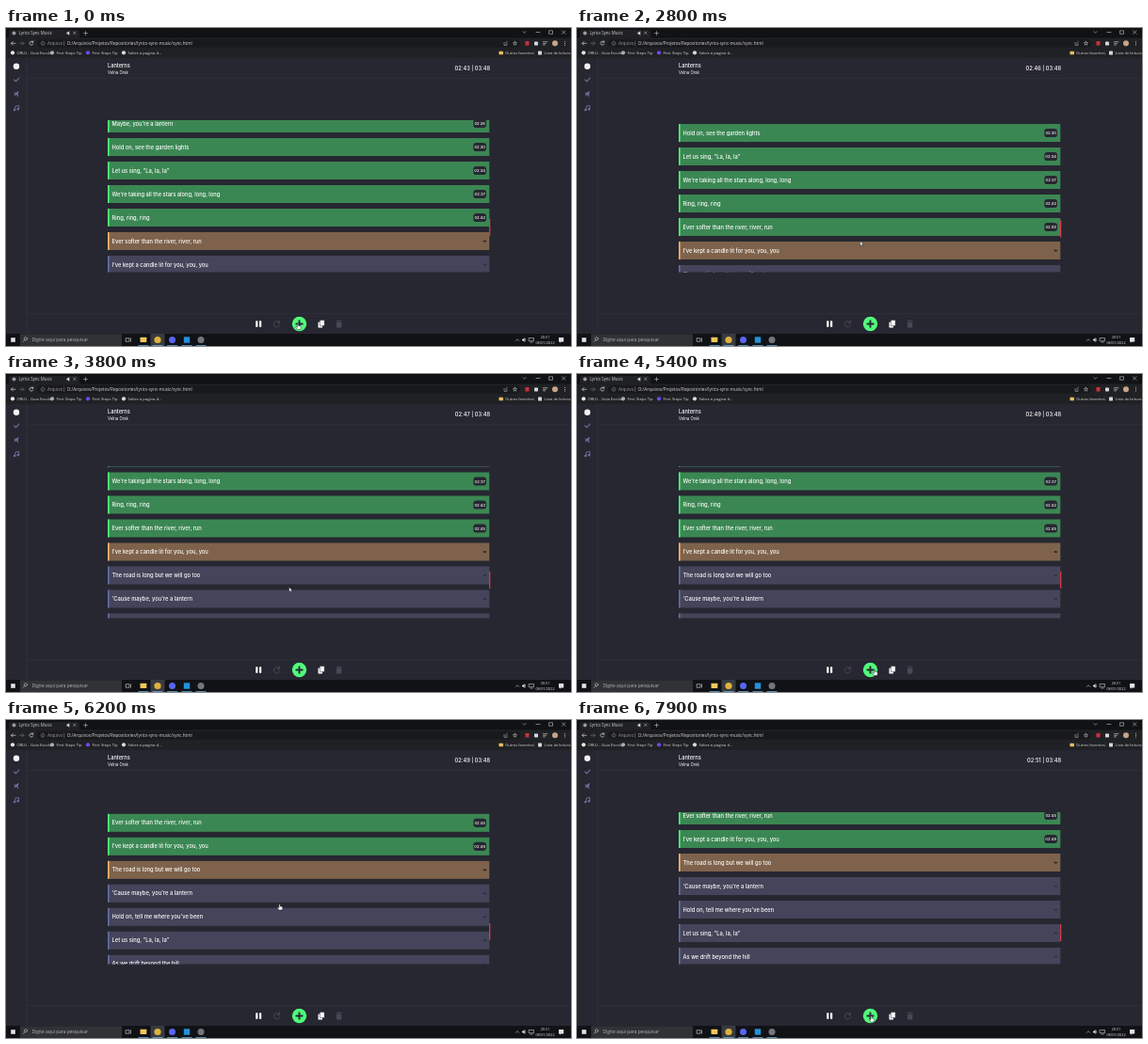
Recreate the animation shown at these times as an HTML page. Size 600x338 px, loop 8000 ms.

```html
<!DOCTYPE html>
<html lang="pt-BR">
<head>
<meta charset="utf-8">
<title>Lyrics Sync Music</title>
<style>
  html, body { margin: 0; width: 100%; height: 100%; overflow: hidden; background: #272731; }
  svg { display: block; width: 100vw; height: 100vh; font-family: Inter, "Open Sans", sans-serif; }
  .chrome { font-family: "Open Sans", "Noto Sans", sans-serif; }
</style>
</head>
<body>
<svg id="stage" viewBox="0 0 600 338" xmlns="http://www.w3.org/2000/svg">
  <defs><clipPath id="listClip"><rect x="100" y="98" width="420" height="161.5"/></clipPath></defs>
  <rect width="600" height="338" fill="#272731"/>
  <g id="browser" class="chrome"></g>
  <g id="page"></g>
  <g id="list" clip-path="url(#listClip)"><g id="cards"></g></g>
  <rect id="thumb" x="513" width="1.3" height="18" fill="#d63a48"/>
  <g id="controls"></g>
  <g id="taskbar" class="chrome"></g>
  <g id="cursor" stroke="#16161c" stroke-width=".45" stroke-linejoin="round" fill="#fff">
    <path id="arrow" d="M0 0V5.2L1.2 4.1 2 5.8 2.8 5.4 2 3.8H3.7Z"/>
    <path id="hand" d="M-.6 0Q0-.7.6 0V2L2.8 2.5Q3.5 2.8 3.3 3.7L2.7 6H-.6L-2.3 3.7Q-2.3 2.8-1.5 3.1L-.6 3.8Z"/>
  </g>
</svg>
<script>
const LOOP = 8000, PITCH = 25, FIRST_Y = 101.5, NOTCHES = 62.5;
const START_SECOND = 163, FIRST_TICK = 350;
const $ = id => document.getElementById(id);

function add(parent, tag, attrs, text) {
  const node = document.createElementNS("http://www.w3.org/2000/svg", tag);
  for (const key in attrs) node.setAttribute(key, attrs[key]);
  if (text !== undefined) node.textContent = text;
  parent.appendChild(node);
  return node;
}
const rect = (p, x, y, width, height, fill, rx = 0) => add(p, "rect", { x, y, width, height, fill, rx });
const dot = (p, cx, cy, r, fill) => add(p, "circle", { cx, cy, r, fill });
const text = (p, x, y, size, fill, str, extra = {}) =>
  add(p, "text", { x, y, "font-size": size, fill, ...extra }, str);
const line = (p, d, stroke, width = .8) =>
  add(p, "path", { d, stroke, "stroke-width": width, fill: "none", "stroke-linecap": "round", "stroke-linejoin": "round" });
const shape = (p, d, fill) => add(p, "path", { d, fill });

function drawBrowser(g) {
  const pale = "#d5d6d9", grey = "#999b9f";
  rect(g, 0, 0, 600, 11, "#111214");
  shape(g, "M1 11Q3 11 3 8V4Q3 2 5 2H76Q78 2 78 4V8Q78 11 80 11Z", "#202124");
  rect(g, 0, 10.5, 600, 21.5, "#202124");
  dot(g, 8.5, 5.5, 2, grey);
  text(g, 13.5, 7.2, 4.4, pale, "Lyrics Sync Music");
  shape(g, "M64.5 4.6H65.6L67.3 3.2V7.8L65.6 6.4H64.5Z", pale);
  line(g, "M71.5 4L74 6.5M74 4 71.5 6.5M82.5 5.5H86.5M84.5 3.5V7.5", pale, .5);
  line(g, "M549 3.7L550.5 5.2 552 3.7M563 4.5H567M577 2.8H580.5V6.3H577ZM590.5 2.8L594 6.3M594 2.8 590.5 6.3", pale, .55);
  rect(g, 33, 12.2, 513, 8.2, "#18191b", 4.1);
  line(g, "M10 16.3H5.5M7.3 14.5 5.5 16.3 7.3 18.1M28.5 14.8A2 2 0 1 0 28.8 17M28.8 13.8V15.2H27.3", pale, .7);
  line(g, "M14.5 16.3H19M17.2 14.5 19 16.3 17.2 18.1", "#6b6d71", .7);
  line(g, "M39 14.3A2 2 0 1 0 39.1 14.3M39 16V17.3M61.7 14V18.7", grey, .5);
  text(g, 44, 18, 4.5, grey, "Arquivo");
  text(g, 65, 18, 4.6, pale, "D:/Arquivos/Projetos/Repositories/lyrics-sync-music/sync.html");
  line(g, "M529 15.5V18.3H532V16.5M530.5 16 532.5 14.2M540.5 14.2L541.1 15.6 542.6 15.7 541.4 16.7 541.8 18.2 540.5 17.4 539.2 18.2 539.6 16.7 538.4 15.7 539.9 15.6Z", pale, .5);
  rect(g, 551.5, 14, 4, 4.5, "#c9303c", .5);
  rect(g, 561, 14.4, 4, 4, pale, .7);
  line(g, "M570.5 14.7H575M570.5 16.3H573.5M570.5 17.9H572.5", pale, .6);
  dot(g, 583, 16.3, 3, "#c9a48b");
  [14.5, 16.3, 18.1].forEach(y => dot(g, 593.5, y, .5, pale));
  const mark = (x, color, label) => {
    dot(g, x, 26.3, 2.1, color);
    text(g, x + 4.4, 28, 4.2, pale, label);
  };
  mark(7, "#e7e7e7", "ORLU - Guia Escolar");
  mark(49, "#a9adb5", "First Steps Tip");
  mark(87, "#7149e8", "First Steps Tip");
  mark(125, "#d8dade", "Sobre a pagina d…");
  rect(g, 523.5, 24.7, 4.5, 3.5, "#e8bd60", .5);
  text(g, 530, 28, 4.1, pale, "Outros favoritos");
  line(g, "M561 23.5V29", "#4a4b4f", .4);
  rect(g, 565, 24.4, 4, 4, pale, .4);
  text(g, 571.5, 28, 4.1, pale, "Lista de leitura");
}

function drawPage(g) {
  const edge = "#353541", violet = "#70709f";
  line(g, "M22 32V325M22 53.7H600M22 303.7H600", edge, .6);
  dot(g, 11, 40.7, 3.2, "#f2f2f5");
  line(g, "M8.6 55L10.4 56.8 13.8 53.2", violet, 1.1);
  shape(g, "M8 68.2L10.2 69 12.8 67.2 13.8 67.5 12.5 70 13.2 72.8 12.4 73 11 70.8 9.2 72.2 8.7 71.1 9.6 70Z", violet);
  line(g, "M9.8 87V83.2L13.6 82.4V86.2", violet, .9);
  dot(g, 9, 87, 1.2, violet);
  dot(g, 12.8, 86.2, 1.2, violet);
  text(g, 108, 42.2, 5.7, "#fff", "Lanterns", { "font-weight": 500 });
  text(g, 108, 48.7, 4.3, "#fff", "Velna Orsk");
  return text(g, 514, 45.2, 5.7, "#fff", "", { "text-anchor": "end", "font-weight": 500 });
}

function drawControls(g) {
  const dim = "#484857";
  rect(g, 265.2, 311.2, 2.2, 6.6, "#fff", .4);
  rect(g, 269, 311.2, 2.2, 6.6, "#fff", .4);
  line(g, "M290 312.7A3.2 3.2 0 1 0 290.6 315.7M290.6 311V313.3H288.2", dim, 1);
  dot(g, 311.5, 314.5, 7.7, "#50fa7b");
  line(g, "M308.3 314.5H314.7M311.5 311.3V317.7", "#272731", 1.9);
  rect(g, 331.5, 312.5, 4.5, 6, "#fff", .6);
  add(g, "rect", { x: 333.3, y: 310.6, width: 4.8, height: 6, rx: .6, fill: "#fff", stroke: "#272731", "stroke-width": .5 });
  rect(g, 350.4, 311.2, 6.4, 1, dim, .3);
  rect(g, 352.3, 310.5, 2.6, 1, dim, .3);
  rect(g, 350.9, 312.8, 5.4, 5.6, dim, .7);
}

function drawTaskbar(g) {
  const pale = "#e2e2e5";
  rect(g, 0, 325, 600, 13, "#101216");
  rect(g, 5.2, 329.2, 4.6, 4.6, pale);
  rect(g, 15, 325.3, 108, 12.7, "#303236");
  line(g, "M22.5 330.2A1.6 1.6 0 1 0 22.5 330.3M19.8 331.7 18.3 333.3", pale, .6);
  text(g, 27.5, 333.3, 4.9, "#b6b7ba", "Digite aqui para pesquisar");
  line(g, "M127.5 329.7H131V333.2H127.5ZM132.5 329.7V333.2", pale, .6);
  rect(g, 153.5, 325, 15, 13, "#383b40");
  rect(g, 142.5, 328.8, 6.8, 5.2, "#f2c75c", .4);
  dot(g, 161, 331.5, 3.6, "#dfb23d");
  dot(g, 176.5, 331.5, 3.5, "#5865f2");
  rect(g, 188.8, 328.3, 6.4, 6.4, "#2491db");
  dot(g, 207, 331.5, 3.5, "#74767c");
  [146, 161, 176.5, 192, 207].forEach(x => rect(g, x - 5.5, 337.2, 11, .8, "#6faad6"));
  line(g, "M541.3 332.4L543 330.7 544.7 332.4M551.3 330Q552.3 331.5 551.3 333M555.5 329.5H560.5V332.7H555.5ZM556.8 334H559.2", pale, .55);
  shape(g, "M548 330.7H549L550.6 329.3V333.7L549 332.3H548Z", pale);
  const mid = { "text-anchor": "middle" };
  text(g, 572.5, 330.3, 3.8, pale, "20:51", mid);
  text(g, 572.5, 336.3, 3.8, pale, "08/01/2022", mid);
  shape(g, "M587 329H592.2V333.5H589.5L588.3 334.8V333.5H587Z", pale);
}

const lyrics = [
  ["Maybe, you're a lantern", "02:26"],
  ["Hold on, see the garden lights", "02:30"],
  ["Let us sing, \"La, la, la\"", "02:34"],
  ["We're taking all the stars along, long, long", "02:37"],
  ["Ring, ring, ring", "02:42"],
  ["Ever softer than the river, river, run", "02:45"],
  ["I've kept a candle lit for you, you, you", "02:49"],
  ["The road is long but we will go too"],
  ["'Cause maybe, you're a lantern"],
  ["Hold on, tell me where you've been"],
  ["Let us sing, \"La, la, la\""],
  ["As we drift beyond the hill"]
];
const styles = {
  done: { fill: "#3b8753", bar: "#50fa7b" },
  active: { fill: "#7e624b", bar: "#ffb86c", dash: "#25252e" },
  waiting: { fill: "#44445a", bar: "#6272a4", dash: "#303043" }
};

function makeCard([words, stamp], i) {
  const g = add($("cards"), "g", { transform: `translate(108 ${i * PITCH})` });
  const body = rect(g, 0, -9.5, 405.3, 19, "");
  const bar = rect(g, 0, -9.5, 1.6, 19, "");
  text(g, 4.5, 2, 5.75, "#fff", words, { "font-weight": 500 });
  const dash = rect(g, 398.6, -.8, 3.6, 1.7, "", .8);
  const chip = add(g, "g", {});
  rect(chip, 388.3, -4.6, 13.8, 9.2, "#272731", 3.2);
  text(chip, 395.2, 1.5, 4.1, "#fff", stamp || "", { "text-anchor": "middle", "font-weight": 500 });
  return state => {
    const style = styles[state];
    body.setAttribute("fill", style.fill);
    bar.setAttribute("fill", style.bar);
    dash.setAttribute("fill", style.dash || "none");
    chip.setAttribute("visibility", state === "done" ? "visible" : "hidden");
  };
}

drawBrowser($("browser"));
const timer = drawPage($("page"));
drawControls($("controls"));
drawTaskbar($("taskbar"));
const cards = lyrics.map(makeCard);

// Pointer stops: time, x, y of the tip
const stops = [
  [0, 310, 314.5], [150, 310, 314.5], [200, 311, 315], [2050, 311, 315],
  [2600, 300.6, 226.5], [4200, 300.6, 226.5], [4900, 316, 314.5], [5550, 316, 314.5],
  [5850, 290.5, 196], [6600, 290.5, 196], [7400, 312.5, 315], [LOOP, 312.5, 315]
];
const smooth = u => { u = Math.min(1, Math.max(0, u)); return u * u * (3 - 2 * u); };
const wheel = (t, start) => NOTCHES * smooth((t - start) / 452);

function pointer(t) {
  const k = stops.findIndex(s => s[0] > t);
  const [a, b] = [stops[k - 1], stops[k]];
  const u = smooth((t - a[0]) / (b[0] - a[0]));
  return [a[1] + (b[1] - a[1]) * u, a[2] + (b[2] - a[2]) * u];
}

function render(t) {
  const second = START_SECOND + Math.max(0, Math.floor((t - FIRST_TICK) / 990) + 1);
  timer.textContent = `0${Math.floor(second / 60)}:${String(second % 60).padStart(2, "0")} | 03:48`;

  const current = 5 + (t >= 1980) + (t >= 5550);
  cards.forEach((paint, i) => paint(i < current ? "done" : i === current ? "active" : "waiting"));

  const scroll = wheel(t, 2657) + wheel(t, 5849);
  $("cards").setAttribute("transform", `translate(0 ${FIRST_Y - scroll})`);
  $("thumb").setAttribute("y", 202.8 + scroll * .114);

  const [x, y] = pointer(t);
  const isArrow = t > 2150 && t < 4800;
  $("cursor").setAttribute("transform", `translate(${x} ${y})`);
  $("arrow").setAttribute("visibility", isArrow ? "visible" : "hidden");
  $("hand").setAttribute("visibility", isArrow ? "hidden" : "visible");
}

const began = performance.now();
function tick() {
  render((performance.now() - began) % LOOP);
  requestAnimationFrame(tick);
}
tick();
</script>
</body>
</html>
```
